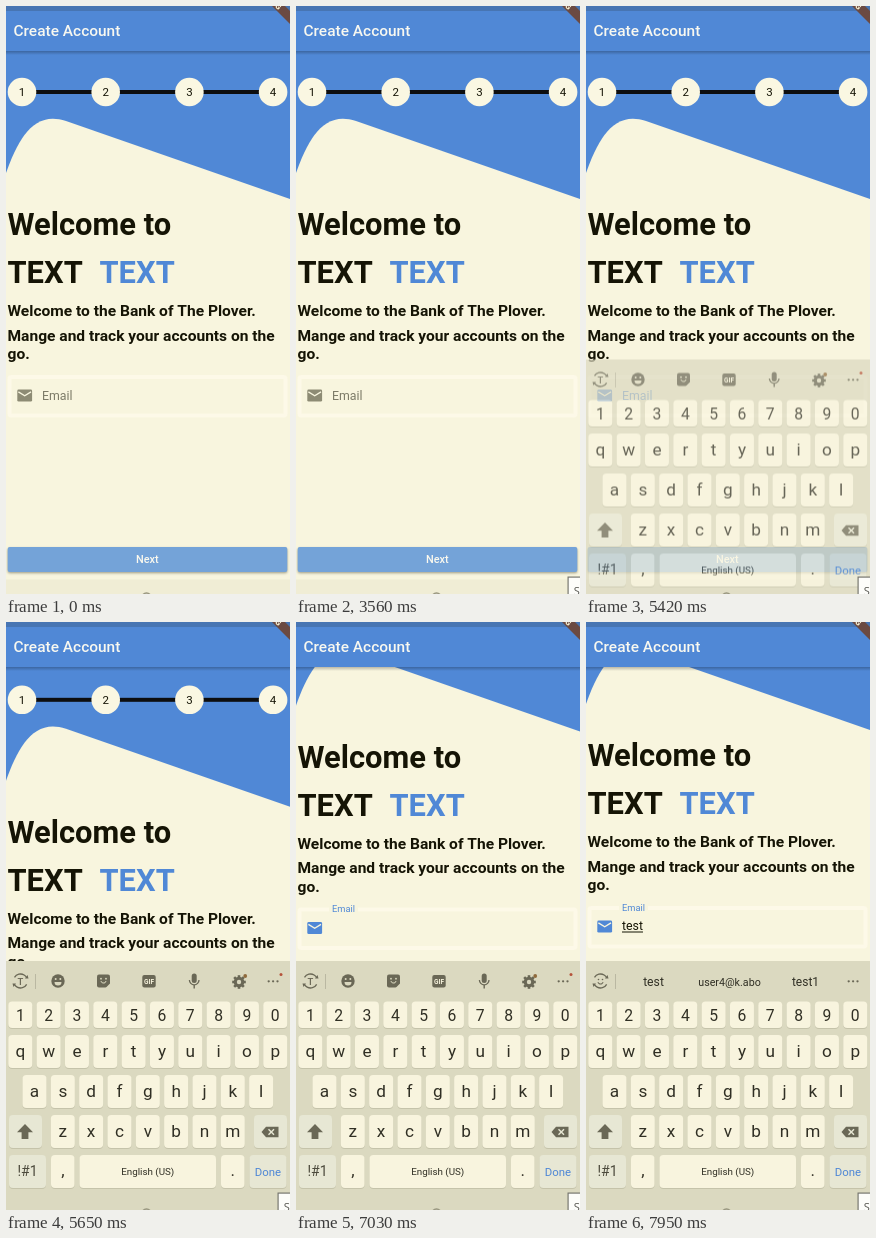
Recreate the animation shown at these times as an HTML page with a canvas. Size 284 px wide and 588 px high, loop 8 s.

```html
<!DOCTYPE html>
<html lang="en">
<head>
<meta charset="utf-8">
<title>Create Account</title>
<style>
html, body { margin: 0; width: 100%; height: 100%; overflow: hidden; background: #f8f5de; }
canvas { display: block; width: 284px; height: 588px; }
</style>
</head>
<body>
<canvas id="stage"></canvas>
<script>
const W = 284, H = 588, LOOP = 8000, TAU = Math.PI * 2;
const BLUE = '#5088d6', CREAM = '#f8f5de', INK = '#151405', ICON = '#6a6856';
const BOARD = '#dbd9c0', KEY = '#f8f4de', KEY_ALT = '#e7e7d4';
const dpr = window.devicePixelRatio || 1;

function prepare(canvas) {
  canvas.width = W * dpr;
  canvas.height = H * dpr;
  const ctx = canvas.getContext('2d');
  ctx.scale(dpr, dpr);
  return ctx;
}

const stage = prepare(document.getElementById('stage'));
const layer = document.createElement('canvas');
const board = prepare(layer);
let g = stage;

const clamp = v => Math.min(1, Math.max(0, v));
const span = (t, from, to) => clamp((t - from) / (to - from));
const easeInOut = p => p < 0.5 ? 4 * p ** 3 : 1 - (2 - 2 * p) ** 3 / 2;
const mix = (a, b, p) => a + (b - a) * p;

function text(str, x, y, size, color, weight = 400, align = 'left') {
  g.font = `${weight} ${size}px Roboto, sans-serif`;
  g.textAlign = align;
  g.textBaseline = 'alphabetic';
  g.fillStyle = color;
  g.fillText(str, x, y);
}

function rect(x, y, w, h, color) {
  g.fillStyle = color;
  g.fillRect(x, y, w, h);
}

function round(x, y, w, h, r, color) {
  g.fillStyle = color;
  g.beginPath();
  g.roundRect(x, y, w, h, r);
  g.fill();
}

function disc(x, y, r, color) {
  g.fillStyle = color;
  g.beginPath();
  g.arc(x, y, r, 0, TAU);
  g.fill();
}

function poly(points, color) {
  g.fillStyle = color;
  g.beginPath();
  points.forEach(([x, y]) => g.lineTo(x, y));
  g.closePath();
  g.fill();
}

function line(points, color, width) {
  g.strokeStyle = color;
  g.lineWidth = width;
  g.beginPath();
  points.forEach(([x, y], i) => i ? g.lineTo(x, y) : g.moveTo(x, y));
  g.stroke();
}

function arc(x, y, r, from, to, color, width) {
  g.strokeStyle = color;
  g.lineWidth = width;
  g.beginPath();
  g.arc(x, y, r, from, to);
  g.stroke();
}

function drawHeader() {
  rect(0, 0, W, 200, BLUE);
  g.fillStyle = CREAM;
  g.beginPath();
  g.moveTo(0, 167);
  g.bezierCurveTo(12, 133, 28, 104, 60, 115);
  g.lineTo(W, 193);
  g.lineTo(W, 720);
  g.lineTo(0, 720);
  g.fill();

  rect(16, 84, 251, 4, '#0d0e10');
  for (let i = 0; i < 4; i++) {
    const x = 16 + i * 83.7;
    disc(x, 86, 14.3, '#faf7e2');
    text(String(i + 1), x, 90, 11.5, INK, 400, 'center');
  }
}

function drawIntro() {
  text('Welcome to', 1.5, 229, 30.9, INK, 700);
  text('TEXT', 1.5, 277, 30.9, INK, 700);
  text('TEXT', 93.5, 277, 30.9, BLUE, 700);
  text('Welcome to the Bank of The Plover.', 1.5, 310, 15.55, INK, 700);
  text('Mange and track your accounts on the', 1.5, 334.5, 15.55, INK, 700);
  text('go.', 1.5, 353, 15.55, INK, 700);
}

function drawField(focused, lift, typed) {
  g.strokeStyle = '#fdf9e8';
  g.lineWidth = 4;
  g.beginPath();
  g.roundRect(3.5, 371, 276, 38.5, 2);
  g.stroke();
  if (lift > 0.5) rect(33, 368, 29, 6, CREAM);

  const tint = focused ? BLUE : '#8d8b74';
  round(11.3, 383.6, 14.8, 12, 1.4, tint);
  line([[12.4, 385.9], [18.7, 389.8], [25, 385.9]], CREAM, 1.4);
  text('Email', 36, mix(394, 373.5, lift), mix(12.35, 9.3, lift), focused ? BLUE : '#7d7b68');

  if (typed) {
    text(typed, 36, 393, 12.35, INK);
    rect(36, 394.5, g.measureText(typed).width, 1, INK);
  }
}

function drawButton() {
  g.save();
  g.shadowColor = 'rgba(40,40,20,.4)';
  g.shadowBlur = 2.5 * dpr;
  g.shadowOffsetY = 1.2 * dpr;
  round(1.7, 541, 279.6, 25, 2, '#74a3d8');
  g.restore();
  text('Next', 141.3, 557, 10.9, '#fbf9ee', 500, 'center');
}

function drawBar() {
  const shade = g.createLinearGradient(0, 45, 0, 49);
  shade.addColorStop(0, 'rgba(0,0,0,.25)');
  shade.addColorStop(1, 'rgba(0,0,0,0)');
  rect(0, 45, W, 4, shade);
  rect(0, 0, W, 45, BLUE);
  rect(0, 0, W, 5, '#4775b3');
  text('Create Account', 7.5, 30, 15.45, '#f8f8f0', 500);

  poly([[266, 0], [279, 0], [284, 5], [284, 18]], '#6b4a42');
  g.save();
  g.translate(265.5, -6.5);
  g.rotate(Math.PI / 4);
  text('DEBUG', 0, 2.8, 7.8, '#f6efd0', 900, 'center');
  g.restore();
}

function key(x, y, w, h, color = KEY) {
  round(x, y + 1, w, h, 4, '#c5c3aa');
  round(x, y, w, h, 4, color);
}

function keyRow(chars, firstX, y, h, size, base) {
  [...chars].forEach((c, i) => {
    const x = firstX + i * 28.33;
    key(x - 12, y, 24, h);
    text(c, x, base, size, '#302f24', 400, 'center');
  });
}

function drawSwap(smile) {
  arc(14.5, 359, 7, -2.6, -0.5, ICON, 1.3);
  arc(14.5, 359, 7, 0.5, 2.6, ICON, 1.3);
  poly([[19, 356.5], [22.5, 356.5], [21.5, 353]], ICON);
  poly([[10, 361.5], [6.5, 361.5], [7.5, 365]], ICON);
  if (smile) {
    disc(12.5, 357.5, 0.8, ICON);
    disc(16.5, 357.5, 0.8, ICON);
    arc(14.5, 359.3, 2.7, 0.3, Math.PI - 0.3, ICON, 1.1);
  } else {
    text('T', 14.5, 362.5, 9.5, ICON, 500, 'center');
  }
}

function drawTools() {
  disc(52, 359, 6.7, ICON);
  disc(49.7, 357, 1, BOARD);
  disc(54.3, 357, 1, BOARD);
  g.fillStyle = BOARD;
  g.beginPath();
  g.arc(52, 360, 3.5, 0, Math.PI);
  g.fill();

  round(91, 352.5, 13, 13, 2, ICON);
  poly([[104.5, 361], [104.5, 366], [99.5, 366]], BOARD);
  poly([[99.5, 361], [103.5, 361], [99.5, 365]], ICON);
  disc(95, 356.7, 0.9, BOARD);
  disc(100, 356.7, 0.9, BOARD);
  arc(97.5, 358.5, 2.6, 0.2, Math.PI - 0.2, BOARD, 1);

  round(136.3, 353, 13.4, 12.5, 2, ICON);
  text('GIF', 143, 361.8, 6.5, KEY, 700, 'center');

  round(185.7, 351.5, 5, 9.5, 2.5, ICON);
  arc(188.2, 358, 4.8, 0, Math.PI, ICON, 1.3);
  line([[188.2, 363], [188.2, 366.5]], ICON, 1.4);

  for (let i = 0; i < 8; i++) {
    const a = i * TAU / 8;
    const dx = Math.cos(a), dy = Math.sin(a);
    line([[233 + dx * 3, 360 + dy * 3], [233 + dx * 6.8, 360 + dy * 6.8]], ICON, 2.6);
  }
  disc(233, 360, 5.3, ICON);
  disc(233, 360, 2.2, BOARD);
  disc(239.2, 354, 1.9, '#8f6a3c');
  disc(275, 352.6, 1.5, '#b5533a');
}

function drawKeyboard(typed) {
  g.clearRect(0, 0, W, H);
  rect(0, 339, W, H, BOARD);
  drawSwap(Boolean(typed));
  rect(29, 352, 1, 15, '#bab8a2');
  if (typed) {
    text('test', 67.5, 363.7, 12.2, '#302f24', 400, 'center');
    text('user4@k.abo', 143.5, 363.5, 10.7, '#302f24', 400, 'center');
    text('test1', 219.5, 363.7, 12, '#302f24', 400, 'center');
  } else {
    drawTools();
  }
  for (let i = 0; i < 3; i++) disc(262.7 + i * 4.4, 359.3, 1.15, ICON);

  keyRow('1234567890', 14.3, 379.5, 26.5, 15.7, 398.7);
  keyRow('qwertyuiop', 14.3, 413, 33, 17.2, 435.2);
  keyRow('asdfghjkl', 28.5, 453, 33, 17.2, 475.2);
  keyRow('zxcvbnm', 56.8, 493, 33, 17.2, 515.2);

  key(3, 493, 33, 33, KEY_ALT);
  poly([[19, 502], [27, 510.3], [22.4, 510.3], [22.4, 517], [15.6, 517], [15.6, 510.3], [11, 510.3]], ICON);
  key(248, 493, 33, 33, KEY_ALT);
  poly([[255.5, 510], [260, 504.7], [272.5, 504.7], [272.5, 515.3], [260, 515.3]], ICON);
  line([[262.5, 507.3], [268, 512.7]], KEY_ALT, 1.4);
  line([[268, 507.3], [262.5, 512.7]], KEY_ALT, 1.4);

  key(3, 533, 37, 33, KEY_ALT);
  text('!#1', 21.5, 554.3, 14, '#4c4a3c', 400, 'center');
  key(45, 533, 23.5, 33);
  text(',', 56.8, 554, 17, '#302f24', 400, 'center');
  key(73.5, 533, 136.5, 33);
  text('English (US)', 141.7, 553.2, 9.8, '#302f24', 400, 'center');
  key(215, 533, 23.5, 33);
  text('.', 226.8, 554, 17, '#302f24', 400, 'center');
  key(243.5, 533, 37, 33, KEY_ALT);
  text('Done', 262, 553.5, 11.4, '#4d86d6', 400, 'center');
}

function typedAt(t) {
  const hits = [7330, 7530, 7720, 7880];
  return 'test'.slice(0, hits.filter(h => t >= h).length);
}

function render(t) {
  const shown = span(t, 5280, 5474);
  const typed = typedAt(t);
  const scroll = 83.5 * easeInOut(span(t, 5590, 5800)) + 1.5 * span(t, 7330, 7430);
  const lift = easeInOut(span(t, 5430, 5630));

  g = stage;
  rect(0, 0, W, H, CREAM);
  g.save();
  g.translate(0, -scroll);
  drawHeader();
  drawIntro();
  drawField(t >= 5260, lift, typed);
  g.restore();
  drawButton();
  rect(0, 573.5, W, 15, '#f0edd5');
  drawBar();

  if (shown > 0) {
    g = board;
    drawKeyboard(typed);
    g = stage;
    const drop = 53 * (1 - shown);
    g.globalAlpha = shown;
    g.drawImage(layer, 0, drop, W, H);
    g.globalAlpha = 1;
  }

  arc(140.5, 592, 5, Math.PI, TAU, '#98967f', 1.3);
  if (t >= 360) {
    rect(271.5, 570.5, 14, 19, '#77776f');
    rect(272.7, 571.7, 14, 19, '#fdfdfa');
    g.font = '11px "Open Sans", sans-serif';
    g.textAlign = 'left';
    g.fillStyle = '#55554f';
    g.fillText('S', 277.8, 588.5);
  }
}

const start = performance.now();
function tick() {
  render((performance.now() - start) % LOOP);
  requestAnimationFrame(tick);
}
tick();
</script>
</body>
</html>
```
